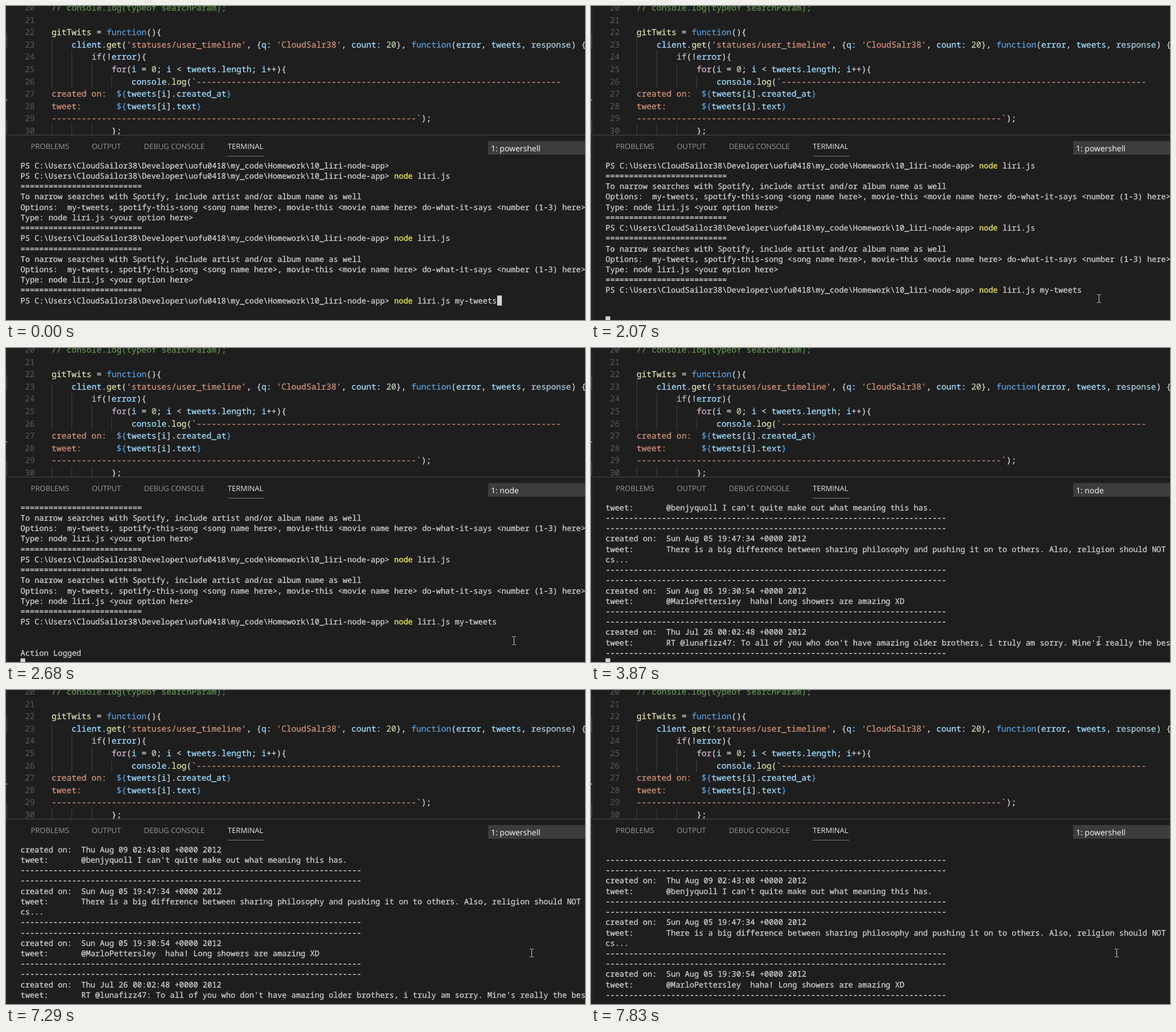
Write an HTML page that moves like this. It is 1016x551 px and loops after 8000 ms.

```html
<!DOCTYPE html>
<html lang="en">
<head>
<meta charset="utf-8">
<title>Terminal session</title>
<style>
  html, body { margin: 0; width: 100%; height: 100%; overflow: hidden; background: #1e1e1e; }
  svg { display: block; width: 100%; height: 100%; }
  text { white-space: pre; text-rendering: geometricPrecision; font-variant-ligatures: none; }
  .code { font: 14.62px "Noto Sans Mono", "DejaVu Sans Mono", monospace; }
  .term { font: 13.67px "Noto Sans Mono", "DejaVu Sans Mono", monospace; }
  .code tspan, .term tspan { stroke-width: .3px; }
  .ui { font: 13px "Open Sans", "Noto Sans", sans-serif; }
  .pick { font-size: 14px; }
</style>
</head>
<body>
<svg id="stage" viewBox="0 0 1016 551" preserveAspectRatio="none">
  <defs>
    <clipPath id="editorClip"><rect width="1016" height="225.5"/></clipPath>
  </defs>
  <rect width="1016" height="551" fill="#1e1e1e"/>
  <rect width="3" height="551" fill="#252526"/>
  <path d="M0 48h2v26h-2zM0 200h2v24h-2z" fill="#3c3c3c"/>
  <rect y="164" width="2" height="2" fill="#a0a0a0"/>
  <g id="editor" clip-path="url(#editorClip)"></g>
  <rect x="3" y="226" width="1013" height="1" fill="#4a4a4a"/>
  <g id="tabs"></g>
  <rect x="389" y="263" width="64" height="1" fill="#7c7c7c"/>
  <rect x="846" y="237" width="170" height="24" fill="#3c3c3c"/>
  <g id="log"></g>
  <rect id="caret" width="8.2" height="17.5" fill="#d4d4d4"/>
  <path id="mouse" d="M-3.5-7h2.5l1 1 1-1h2.5M0-6V6M-3.5 7h2.5l1-1 1 1h2.5" fill="none" stroke="#d0d0d0"/>
</svg>
<script>
const NS = 'http://www.w3.org/2000/svg';
const $ = id => document.getElementById(id);
const LOOP = 8000;

function add(parent, tag, attrs, content = '') {
  const el = document.createElementNS(NS, tag);
  for (const key in attrs) el.setAttribute(key, attrs[key]);
  el.textContent = content;
  return parent.appendChild(el);
}

// Each run is [colour key, text].
function addRuns(parent, attrs, runs) {
  const el = add(parent, 'text', attrs);
  for (const [key, str] of runs) add(el, 'tspan', { fill: COLORS[key], stroke: COLORS[key] }, str);
  return el;
}

const COLORS = {
  t: '#d4d4d4', k: '#569cd6', s: '#ce9178', f: '#dcdcaa', v: '#9cdcfe',
  n: '#b5cea8', c: '#608b4e', w: '#c9b1c7', u: '#a8c8d8', l: '#d0d0d0', y: '#f0f046'
};

// Editor
const CODE_W = 8.77, CODE_H = 21.6, CODE_X = 80;
const dashes = '-'.repeat(73);
const field = name => [['k', '${'], ['v', 'tweets'], ['t', '['], ['v', 'i'], ['t', '].'], ['v', name], ['k', '}']];
const code = [
  [0, [['c', '// console.log(typeof searchParam);']]],
  [0, []],
  [0, [['f', 'gitTwits'], ['t', ' = '], ['k', 'function'], ['t', '(){']]],
  [1, [['v', 'client'], ['t', '.'], ['f', 'get'], ['t', '('], ['s', "'statuses/user_timeline'"], ['t', ', {'],
       ['v', 'q:'], ['s', " 'CloudSalr38'"], ['t', ', '], ['v', 'count:'], ['n', ' 20'], ['t', '}, '],
       ['k', 'function'], ['t', '('], ['v', 'error'], ['t', ', '], ['v', 'tweets'], ['t', ', '],
       ['u', 'response'], ['t', ') {']]],
  [2, [['w', 'if'], ['t', '(!'], ['v', 'error'], ['t', '){']]],
  [3, [['w', 'for'], ['t', '('], ['v', 'i'], ['t', ' = '], ['n', '0'], ['t', '; '], ['v', 'i'], ['t', ' < '],
       ['v', 'tweets'], ['t', '.'], ['v', 'length'], ['t', '; '], ['v', 'i'], ['t', '++){']]],
  [4, [['v', 'console'], ['t', '.'], ['f', 'log'], ['t', '('], ['s', '`' + dashes]]],
  [0, [['s', 'created on:  '], ...field('created_at')]],
  [0, [['s', 'tweet:       '], ...field('text')]],
  [0, [['s', dashes + '`'], ['t', ');']]],
  [3, [['t', '};']]]
];
code.forEach(([indent, runs], i) => {
  const y = Math.round(8 + i * CODE_H), tab = 4 * CODE_W;
  add($('editor'), 'text', { class: 'code', x: 33, y, fill: '#5a5a5a' }, String(20 + i));
  for (let g = 0; g < indent; g++)
    add($('editor'), 'rect', { x: Math.round(CODE_X + g * tab), y: y - 16, width: 1, height: 22, fill: '#404040' });
  addRuns($('editor'), { class: 'code', x: CODE_X + indent * tab, y }, runs);
});

// Panel header
[[44, 'PROBLEMS'], [151, 'OUTPUT'], [242.5, 'DEBUG CONSOLE'], [389.5, 'TERMINAL']].forEach(([x, label]) =>
  add($('tabs'), 'text', { class: 'ui', x: x - 0.5, y: 251, fill: label === 'TERMINAL' ? '#e7e7e7' : '#979797' }, label));
const shellName = add($('stage'), 'text', { class: 'ui pick', x: 851, y: 255, fill: '#fff' });

// Terminal
const TERM_W = 8.2, TERM_H = 18.22, TERM_X = 25.5, TERM_Y = 271.3;
const plain = str => [['l', str]];
const prompt = (cmd = '', args = '') => [
  ['l', 'PS C:\\Users\\CloudSailor38\\Developer\\uofu0418\\my_code\\Homework\\10_liri-node-app> '],
  ['y', cmd], ['l', args]
];
const bar = plain('='.repeat(26)), rule = plain(dashes);
const help = [
  bar,
  plain('To narrow searches with Spotify, include artist and/or album name as well'),
  plain('Options:  my-tweets, spotify-this-song <song name here>, movie-this <movie name here> do-what-it-says <number (1-3) here>'),
  plain('Type: node liri.js <your option here>'),
  bar
];
const tweet = (date, body, ...rest) => [
  rule,
  plain('created on:  ' + date + ' +0000 2012'),
  plain('tweet:       ' + body),
  ...rest.map(plain),
  rule
];
const lines = [
  prompt(),
  prompt('node', ' liri.js'), ...help,
  prompt('node', ' liri.js'), ...help,
  prompt('node', ' liri.js my-tweets'),
  [], [], plain('Action Logged'),
  [], rule,
  ...tweet('Thu Aug 09 02:43:08', "@benjyquoll I can't quite make out what meaning this has."),
  ...tweet('Sun Aug 05 19:47:34',
    'There is a big difference between sharing philosophy and pushing it on to others. Also, religion should NOT', 'cs...'),
  ...tweet('Sun Aug 05 19:30:54', '@MarloPettersley  haha! Long showers are amazing XD'),
  ...tweet('Thu Jul 26 00:02:48',
    "RT @lunafizz47: To all of you who don't have amazing older brothers, i truly am sorry. Mine's really the best"),
  prompt()
];
const rows = lines.map(runs => addRuns($('log'), { class: 'term', x: TERM_X }, runs));

// [time, top line, caret line, caret column, shell]
const screens = [
  [0, 0, 13, 102, 'powershell'],
  [2070, 1, 16, 0, 'powershell'],
  [2150, 1, 16, 0, 'node'],
  [2680, 2, 17, 0, 'node'],
  [3870, 21, 36, 0, 'node'],
  [3950, 21, 36, 80, 'node'],
  [4020, 21, 36, 80, 'powershell'],
  [7290, 20, 36, 80, 'powershell'],
  [7520, 19, 36, 80, 'powershell'],
  [7600, 18, 36, 80, 'powershell'],
  [7830, 17, 36, 80, 'powershell']
];
// [time, x, y]
const pointer = [
  [0, -50, -50],
  [380, 896.5, 537.5], [460, 894.5, 531.5], [540, 892.5, 525.5], [610, 890.5, 519.5], [690, 888.5, 513.5],
  [1150, 891.5, 513.5],
  [4970, 901.5, 496.5], [5050, 912.5, 478.5], [5120, 922.5, 461.5]
];
const latest = (list, t) => list.filter(item => item[0] <= t).pop();

function draw(t) {
  const [, top, line, col, shell] = latest(screens, t);
  rows.forEach((row, i) => {
    const shown = i >= top && (i < line || (i === line && col > 0));
    row.setAttribute('y', Math.round(TERM_Y + 13.5 + (i - top) * TERM_H));
    row.setAttribute('visibility', shown ? 'visible' : 'hidden');
  });
  $('caret').setAttribute('x', TERM_X + col * TERM_W);
  $('caret').setAttribute('y', TERM_Y + (line - top) * TERM_H);
  shellName.textContent = '1: ' + shell;
  const [, x, y] = latest(pointer, t);
  $('mouse').setAttribute('transform', `translate(${x} ${y})`);
}

const start = performance.now();
function tick() {
  draw((performance.now() - start) % LOOP);
  requestAnimationFrame(tick);
}
tick();
</script>
</body>
</html>
```
